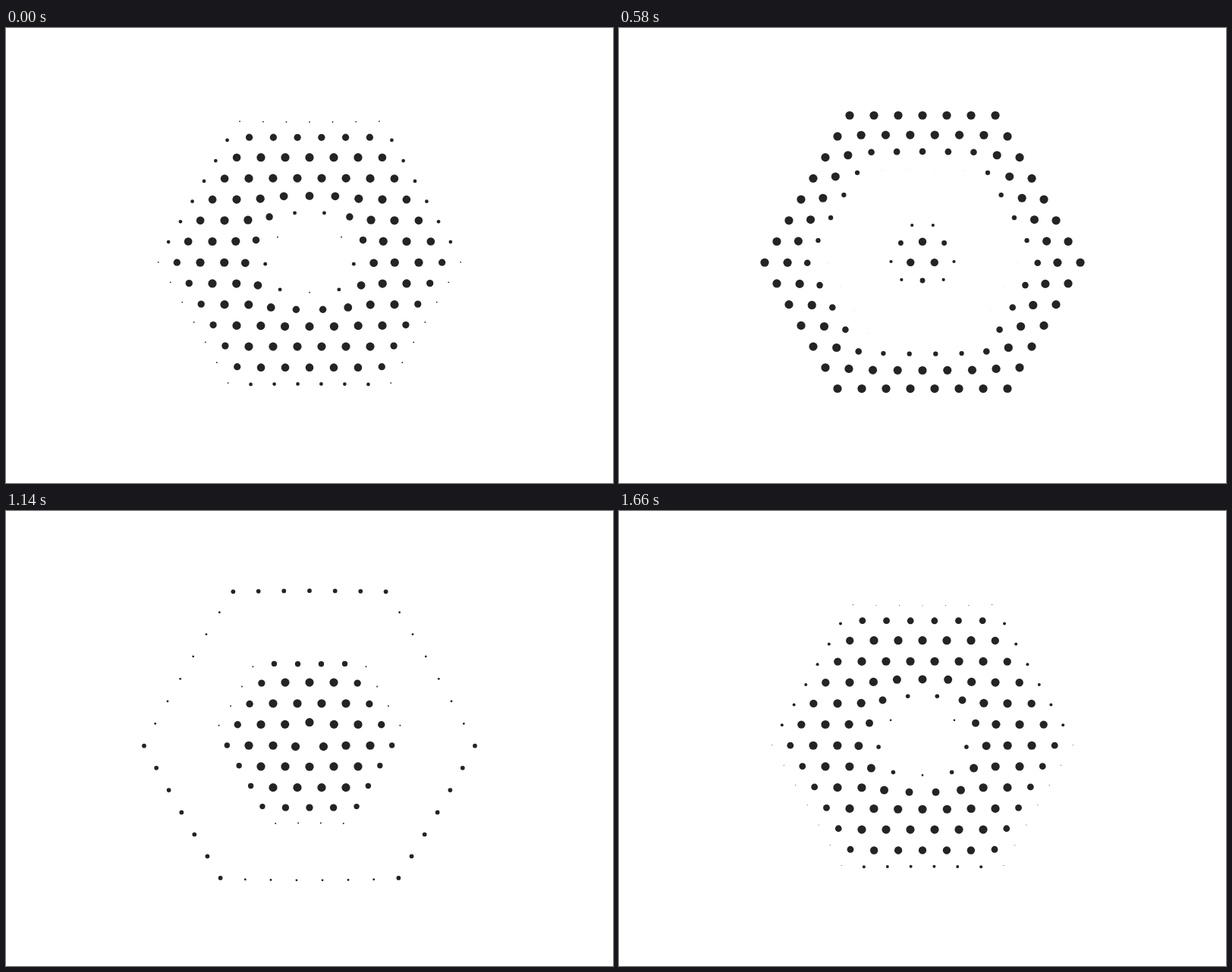
Animation, 800 px wide and 600 px high, one loop 1.68 s. Source, as an HTML page with a canvas:

```html
<!DOCTYPE html>
<html lang="en">
<head>
<meta charset="utf-8">
<title>Hexagon dot wave</title>
<style>
  html, body { margin: 0; width: 100%; height: 100%; overflow: hidden; background: #fff; }
  canvas { display: block; }
</style>
</head>
<body>
<canvas id="stage" width="800" height="600"></canvas>
<script>
const ctx = document.getElementById('stage').getContext('2d');
const LOOP = 1680, STEP = 20;
const CX = 400, CY = 300;
const GAP = 32, ROW = GAP * Math.sqrt(3) / 2;
const UNIT = ROW / 3;           // distance from one ring side to the next is 1 or 2 units
const CYCLE = 200 / UNIT;       // units the wave travels in one loop
const RADIUS = 5.6, SHIFT = 12.3;

const clamp = v => Math.max(0, Math.min(1, v));
const easeCos = p => (1 - Math.cos(Math.PI * clamp(p))) / 2;
const easeSin = p => Math.sin(Math.PI / 2 * clamp(p));

// Hexagonal distance: the farthest reach along the six side normals.
function hexDist(x, y) {
  const a = x * Math.sqrt(3) / 2;
  return Math.max(Math.abs(y), Math.abs(a + y / 2), Math.abs(a - y / 2));
}

const dots = [];
for (let k = -7; k <= 6; k++) {
  const count = 14 - Math.abs(k);
  const y = k * ROW + UNIT;
  for (let i = 0; i < count; i++) {
    const x = (i - (count - 1) / 2) * GAP;
    dots.push({ x, y, dist: Math.hypot(x, y), delay: hexDist(x, y) / UNIT });
  }
}

function draw(ms) {
  ctx.fillStyle = '#fff';
  ctx.fillRect(0, 0, 800, 600);
  ctx.fillStyle = '#252324';
  for (const dot of dots) {
    const raw = dot.delay - ms / LOOP * CYCLE;
    const x = (raw % CYCLE + CYCLE) % CYCLE;
    const r = RADIUS * Math.min(easeSin((x - 3.4) / 5.6), easeSin((20.6 - x) / 5.8));
    if (r < 0.1) continue;
    // Dots grow in from nearer the centre and leave outwards.
    const shift = SHIFT * (easeCos((11.9 - x) / 9.2) - easeCos((x - 15.5) / 7));
    const scale = 1 + shift / dot.dist;
    ctx.beginPath();
    ctx.arc(CX + dot.x * scale, CY + dot.y * scale, r, 0, Math.PI * 2);
    ctx.fill();
  }
}

const start = performance.now();
function tick() {
  const ms = Math.max(0, performance.now() - start) % LOOP;
  draw(Math.floor(ms / STEP) * STEP);
  requestAnimationFrame(tick);
}
tick();
</script>
</body>
</html>
```
